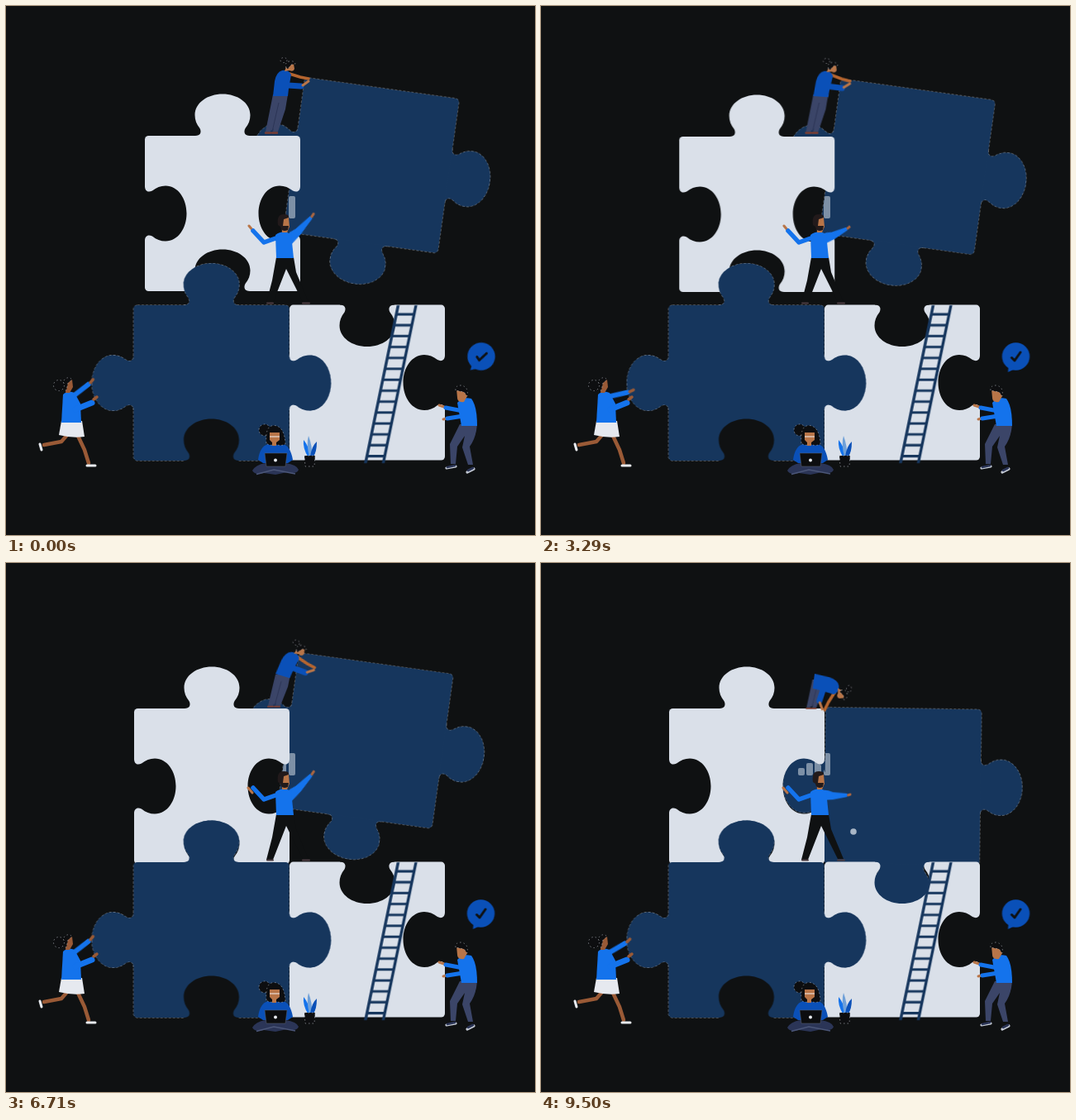
Recreate the animation shown at these times as an HTML page without scripts. Size 640 by 640 pixels, loop 9.57 s.

```html
<!DOCTYPE html>
<html lang="en">
<head>
<meta charset="utf-8">
<title>Puzzle teamwork</title>
<style>
  :root {
    --bg: #0f1112; --navy: #16365d; --pale: #dae0e9; --blue: #1473ec;
    --royal: #0a50b8; --slate: #3b4568; --skin: #b87548; --brown: #9a5a36;
  }
  html, body { margin: 0; height: 100%; overflow: hidden; background: var(--bg); }
  svg { display: block; width: 100vw; height: 100vh; }

  .navy { fill: var(--navy); }
  .pale { fill: var(--pale); }
  .bg { fill: var(--bg); }
  .blue { fill: var(--blue); }
  .royal { fill: var(--royal); }
  .slate { fill: var(--slate); }
  .skin { fill: var(--skin); }
  .hair { fill: #0d0e10; stroke: #b9bdc4; stroke-width: .6; stroke-dasharray: 1.5 3; }
  .limb { fill: none; stroke-linecap: round; stroke-linejoin: round; }
  .rim { stroke: #d5dbe5; stroke-width: .9; stroke-opacity: .7; stroke-dasharray: 3 2; }

  .slide, .drop, .walk, .crouch, .lean, .reach, .lift, .push, .rock {
    animation: 9570ms ease-in-out infinite;
  }
  .slide { animation-name: slide; }
  .drop { animation-name: drop; }
  .walk { animation-name: walk; }
  .crouch { animation-name: crouch; }
  .lean { animation-name: lean; }
  .reach { animation-name: reach; }
  .lift { animation-name: lift; }
  .push { animation-name: push; }
  .rock { animation-name: rock; }
  .lower { animation: lower 9570ms linear infinite; }

  /* top right piece */
  @keyframes slide {
    0%, 38%, 56% { transform: translate(362px, 86.5px) rotate(8deg); }
    16.5% { transform: translate(369.4px, 95px) rotate(8deg); }
    34.4% { transform: translate(363.3px, 88.3px) rotate(8deg); animation-timing-function: ease-out; }
    56% { animation-timing-function: ease-in; }
    70.1% { transform: translate(354.8px, 108.5px) rotate(8deg); animation-timing-function: ease-out; }
    83%, 100% { transform: translate(344.8px, 174.8px) rotate(.8deg); }
  }
  /* top left piece */
  @keyframes drop {
    0%, 31% { transform: translate(168px, 157px); animation-timing-function: ease-in; }
    34.4% { transform: translate(167.2px, 158px); animation-timing-function: linear; }
    55.3% { transform: translate(158.3px, 171.3px); animation-timing-function: ease-out; }
    67%, 100% { transform: translate(155px, 176px); }
  }
  /* woman on top */
  @keyframes walk {
    0% { transform: translate(320px, 155px); }
    16.5% { transform: translate(336.5px, 155px); }
    34.4% { transform: translate(326.5px, 155px); animation-timing-function: linear; }
    55.3% { transform: translate(322px, 171px); }
    70.1% { transform: translate(323px, 175px); }
    83%, 100% { transform: translate(326px, 177px); }
  }
  @keyframes crouch {
    0%, 34.4% { transform: scaleY(1); }
    55.3% { transform: scaleY(.87); }
    70.1% { transform: scaleY(.84); }
    83%, 100% { transform: scale(.8, .75); }
  }
  @keyframes lean {
    0%, 18.7% { transform: translate(11px, -47px); }
    34.4% { transform: translate(11px, -46.5px) rotate(4deg); }
    55.3% { transform: translate(11px, -40.5px) rotate(14deg); }
    70.1% { transform: translate(11px, -39.5px) rotate(17deg); }
    83%, 100% { transform: translate(5px, -35px) rotate(97deg); }
  }
  @keyframes reach {
    0%, 70.1% { transform: translate(9px, -26px); }
    83%, 100% { transform: translate(9px, -26px) rotate(8deg); }
  }
  /* man in the middle */
  @keyframes lift {
    0% { transform: translate(344px, 280px) rotate(-44deg); }
    18.7% { transform: translate(344px, 280px) rotate(-32deg) scaleX(.89); animation-timing-function: ease-out; }
    34.4% { transform: translate(344px, 280px) rotate(-22deg) scaleX(.8); }
    55.3% { transform: translate(344px, 280px) rotate(-39.6deg) scaleX(.94); }
    70.1% { transform: translate(344px, 280px) rotate(-43deg) scaleX(.99); }
    85.8% { transform: translate(344px, 280px) rotate(-18.5deg) scaleX(.79); }
    100% { transform: translate(344px, 280px) rotate(2deg) scaleX(.76); }
  }
  @keyframes lower {
    0%, 34.4% { transform: rotate(0deg); }
    55.3%, 100% { transform: translate(-1px, 6px); }
  }
  /* woman on the left */
  @keyframes push {
    0%, 70.1% { transform: translate(80px, 473px) rotate(-40deg); }
    18.7% { transform: translate(80px, 473px) rotate(-26deg); animation-timing-function: ease-out; }
    34.4% { transform: translate(80px, 473px) rotate(-15deg); }
    55.3% { transform: translate(80px, 473px) rotate(-31deg); animation-timing-function: ease-out; }
    85.8% { transform: translate(80px, 473px) rotate(-38deg); }
    100% { transform: translate(80px, 473px) rotate(-33deg); }
  }
  @keyframes rock {
    0% { transform: translate(575px, 424px) rotate(12deg); }
    18.7%, 100% { transform: translate(574.5px, 424px); }
  }
</style>
</head>
<body>
<svg viewBox="0 0 640 640">
  <defs>
    <!-- knob on the top side of a 188 px piece -->
    <path id="knob" d="M61 1V0C67 0 69-4 66.5-9C62.5-14 60.5-19 60.5-25C60.5-40 76-50.5 94-50.5S127.5-40 127.5-25C127.5-19 125.5-14 121.5-9C119-4 121 0 127 0V1Z"/>
    <rect id="body" width="188" height="188" rx="4.5"/>
    <!-- the same knob pointing outwards or inwards on the other sides -->
    <use id="east" href="#knob" transform="translate(188) rotate(90)"/>
    <use id="south" href="#knob" transform="translate(188 188) rotate(180)"/>
    <use id="west" href="#knob" transform="translate(0 188) rotate(-90)"/>
    <use id="northHole" href="#knob" transform="scale(1 -1)"/>
    <use id="southHole" href="#knob" transform="translate(0 188)"/>
    <use id="westHole" href="#knob" transform="rotate(90)"/>
    <use id="eastHole" href="#knob" transform="translate(188 188) rotate(-90)"/>
    <rect id="all" x="-5" y="-55" width="200" height="250" fill="#fff"/>
    <mask id="cutTop" maskUnits="userSpaceOnUse" x="-5" y="-55" width="200" height="250">
      <use href="#all"/><use href="#westHole"/><use href="#eastHole"/><use href="#southHole"/>
    </mask>
    <mask id="cutBottom" maskUnits="userSpaceOnUse" x="-5" y="-55" width="200" height="250">
      <use href="#all"/><use href="#northHole"/><use href="#eastHole"/>
    </mask>
    <clipPath id="overNavy">
      <rect class="slide" width="188" height="188"/>
      <ellipse class="slide" cx="-24" cy="94" rx="27" ry="33.5"/>
    </clipPath>
  </defs>

  <rect class="bg" width="640" height="640"/>

  <!-- puzzle -->
  <g class="slide navy">
    <g class="rim"><use href="#east"/><use href="#south"/><use href="#west"/><use href="#body"/></g>
    <use href="#east"/><use href="#south"/><use href="#west"/><use href="#body"/>
  </g>
  <g transform="translate(343 361.6)">
    <use href="#body" class="pale" mask="url(#cutBottom)"/>
  </g>
  <g class="drop">
    <g class="pale" mask="url(#cutTop)"><use href="#body"/><use href="#knob"/></g>
  </g>
  <g class="pale" opacity=".53" clip-path="url(#overNavy)">
    <rect x="311" y="248" width="8" height="9" rx="2"/>
    <rect x="321" y="242" width="8" height="15" rx="2"/>
    <rect x="331" y="236" width="8" height="21" rx="2"/>
    <rect x="342" y="230" width="8" height="27" rx="2"/>
  </g>
  <g clip-path="url(#overNavy)"><circle class="pale" cx="378" cy="325" r="3.8" opacity=".75"/></g>
  <g transform="translate(154.5 362)">
    <g class="navy">
      <g class="rim"><use href="#knob"/><use href="#east"/><use href="#west"/><use href="#body"/></g>
      <use href="#knob"/><use href="#east"/><use href="#west"/><use href="#body"/>
    </g>
    <use href="#southHole" class="bg"/>
  </g>

  <!-- ladder -->
  <g transform="translate(474.5 362) skewX(-11.7)" fill="none" stroke="#16365d">
    <path d="M0 0V191M21.500 0V191" stroke-width="3.5"/>
    <path d="M10.700 9.500V187" stroke-width="21" stroke-dasharray="3 10.200"/>
  </g>

  <!-- speech bubble -->
  <g class="rock">
    <path class="royal" d="M-9 12L-9.500 19L-1 15Z"/>
    <circle class="royal" r="16.7"/>
    <path class="limb" d="M-5 1.500L-1.500 5L5.500-5" stroke="#0f1112" stroke-width="3"/>
  </g>

  <!-- woman on top -->
  <g class="walk">
    <g class="crouch">
      <path class="slate" d="M3-48H21L18-30L9-3H3L7-28L0-3H-6Z"/>
      <path class="slate" d="M4-46H19L11-14L1-4L-3-10Z"/>
      <path d="M10-38L2-3" stroke="#2c3556" fill="none"/>
      <path d="M-6-1.500H0M2-1.500H8" class="limb" stroke="#7a3f35" stroke-width="2.400"/>
    </g>
    <g class="lean">
      <g class="reach">
        <path class="limb" d="M3 0L16 4L26 6" stroke="#b5652f" stroke-width="3.600"/>
        <path class="limb" d="M1 14L17 15" stroke="#0a50b8" stroke-width="7"/>
        <path class="limb" d="M19 14L26 9" stroke="#b87548" stroke-width="3"/>
      </g>
      <path class="royal" d="M-8 1L-6-17Q-4-28 3-30Q11-31 14-25L11-8L10 1Z"/>
      <path class="skin" d="M6-29L9-37L17-38L18-32Q17-28 12-30Z"/>
      <path class="hair" d="M8-33Q6-41 12-41Q18-42 19-38L14-37L10-32Z"/>
      <ellipse class="hair" cx="5" cy="-42.500" rx="4" ry="3"/>
    </g>
  </g>

  <!-- man in the middle -->
  <path class="bg" d="M327 304H348L351 322L366 358H359L339 318L323 359H315L322 332Z"/>
  <path class="limb" d="M316 359.500H323M359 359.500H367" stroke="#4b3b40" stroke-width="2"/>
  <g class="lower">
    <path class="limb" d="M299 272L294 266" stroke="#b87548" stroke-width="3"/>
  </g>
  <path class="limb" d="M332 279L312 286L299 272" stroke="#1473ec" stroke-width="5.500"/>
  <g class="lift">
    <path class="blue" d="M-5-5Q2-6 12-3L35-2V2L12 6L-4 7Z"/>
    <path class="limb" d="M36 0L40-1" stroke="#a96540" stroke-width="3"/>
  </g>
  <path class="blue" d="M326 277Q335 270 345 276L348 305H327Z"/>
  <path class="skin" d="M333 256H342L343 267L340 274H334Z"/>
  <path d="M329 265Q327 252 336 252Q343 252 342 256L336 258L335 266L342 266L341 271Q333 274 332 267Z" fill="#221a1b"/>

  <!-- woman on the left -->
  <g class="limb" stroke="#9a5a36" stroke-width="4.500">
    <path d="M74 519L67 527L46 531"/>
    <path d="M87 520L95 537L100 553"/>
  </g>
  <path class="limb" d="M41 530L43 537M98 556H108" stroke="#e8ebf0" stroke-width="3"/>
  <path fill="#e6e9ef" d="M67 502H92L95 521Q80 523 64 519Z"/>
  <g class="push">
    <path class="limb" d="M0 0L25 1" stroke="#1473ec" stroke-width="6"/>
    <path class="limb" d="M28 1L33 0" stroke="#9a5a36" stroke-width="3.500"/>
  </g>
  <path class="blue" d="M69 470Q75 464 83 468L90 481L91 504H67Z"/>
  <path class="limb" d="M84 488L104 480" stroke="#1473ec" stroke-width="7"/>
  <path class="limb" d="M106 476L110 473" stroke="#9a5a36" stroke-width="3.500"/>
  <path fill="#9a5a36" d="M73 452H80L81 461L77 468H72Z"/>
  <path class="hair" d="M70 453Q75 447 80 452L75 456L73 465L67 463Z"/>
  <circle class="hair" cx="64" cy="459" r="6.500"/>

  <!-- seated woman -->
  <circle class="hair" cx="313" cy="513" r="7"/>
  <path class="royal" d="M305 549Q307 533 317 530H335Q344 532 347 549L341 553H311Z"/>
  <path class="hair" d="M315 529Q313 507 325 507.500Q337 509 338 530Q332 533 326 530Q320 533 315 529Z"/>
  <path class="skin" d="M319 516H331V525L327 528V532H322V528L319 525Z"/>
  <path d="M319 521H331" stroke="#dfc9bb" stroke-width="1.500"/>
  <path fill="#2b3557" d="M314 553H338Q352 555 354 561Q352 567 340 564L326 567L312 565Q301 568 298 562Q302 555 314 553Z"/>
  <path d="M303 566.500L324 561L350 566" fill="none" stroke="#4b5678" stroke-width="1.500"/>
  <path fill="#0c0d0f" stroke="#5b6270" stroke-width=".5" d="M313 541H340L338 557H315Z"/>
  <circle cx="326" cy="549.500" r="2" fill="#e8ebf0"/>

  <!-- plant -->
  <path class="blue" d="M365 545Q359 535 360 525Q367 533 368 545Z"/>
  <path fill="#6fa0d8" d="M367 545Q363 530 366 520Q371 533 370 545Z"/>
  <path class="royal" d="M368 545Q370 532 376 527Q376 539 372 545Z"/>
  <path class="hair" d="M361 544H374L373 557H362Z"/>

  <!-- man on the right -->
  <path class="limb" d="M529 500L533 499M524 483L530 485" stroke="#b87548" stroke-width="3"/>
  <path class="limb" d="M532 486L553 490M534 499L553 496" stroke="#1473ec" stroke-width="5"/>
  <path class="slate" d="M549 506H570Q569 522 561 533L565 555H559L552 534L555 520L546 533L544 554H538L537 530Z"/>
  <path class="blue" d="M546 480Q553 472 563 475Q570 484 570 508H551Z"/>
  <path class="skin" d="M545 463H555L558 472L554 479Q546 480 546 474Z"/>
  <path class="hair" d="M544 465Q543 459 551 459Q560 461 558 472L554 467Z"/>
  <path class="limb" d="M533 559L544 557M558 564L566 560" stroke="#c5cbd5" stroke-width="3.200"/>
  <path class="limb" d="M534 558L543 556M559 562L565 559" stroke="#2b3557" stroke-width="2.600"/>
</svg>
</body>
</html>
```
